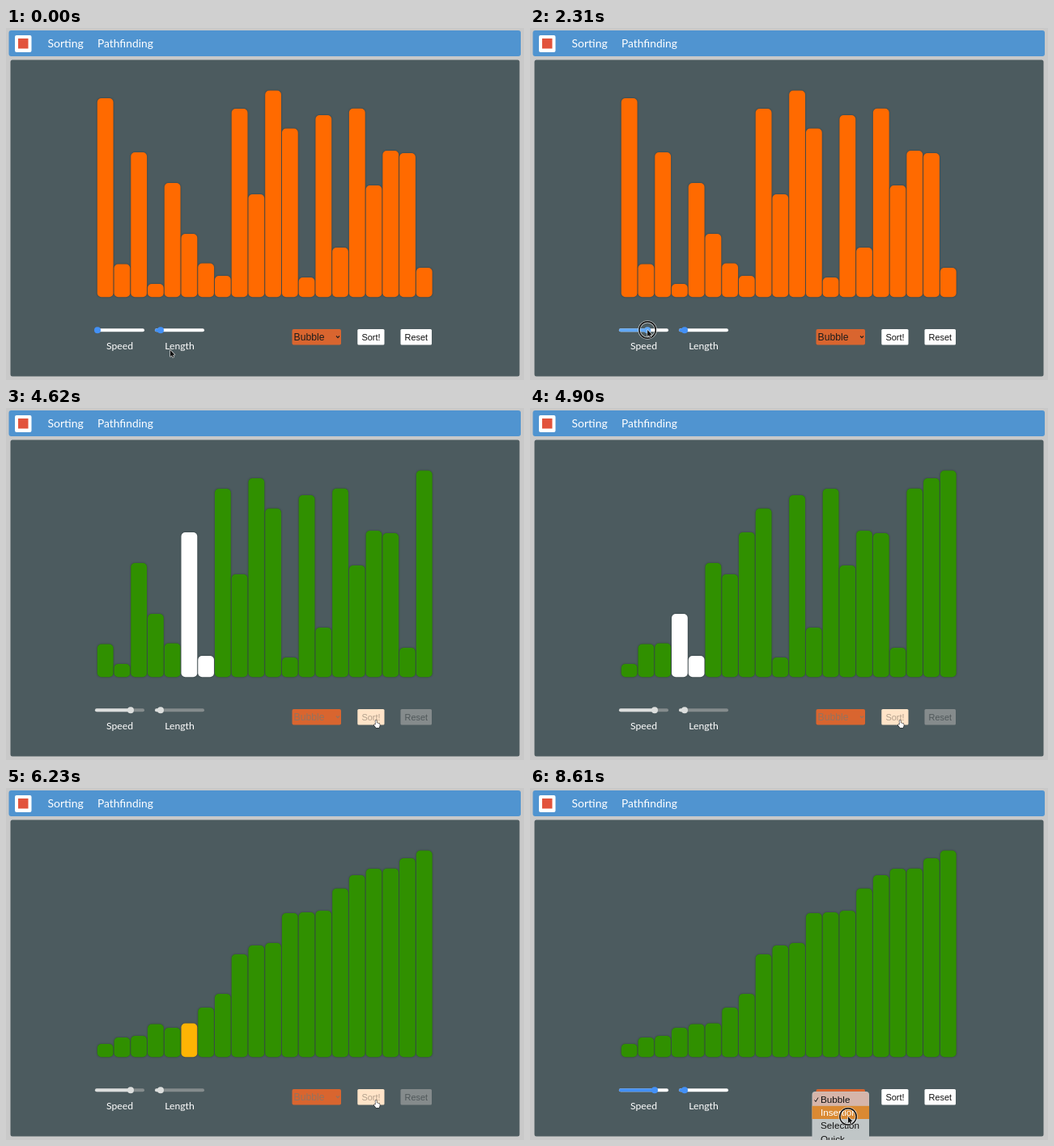
Write an HTML page with a canvas that moves like this. It is 640 px wide and 436 px high and loops after 8680 ms.

```html
<!DOCTYPE html>
<html lang="en">
<head>
<meta charset="utf-8">
<title>Sorting visualizer</title>
<style>
  html, body { margin: 0; width: 640px; height: 436px; overflow: hidden; background: #c9c9c9; }
  canvas { display: block; }
</style>
</head>
<body>
<canvas id="stage" width="640" height="436"></canvas>
<script>
const ctx = document.getElementById('stage').getContext('2d');
const LOOP = 8680, TICK = 70;
const BASE = 333, BAR_X = 112.8, PITCH = 20.74, BAR_W = 19.8;
const HEIGHTS = [246, 40.5, 179, 16, 141, 78, 41.5, 26, 233, 127,
  255.5, 208.5, 24, 225, 61, 233.2, 138, 181, 178, 36];

// Bubble sort timing in ms
const SORT_START = 4418, COMPARE = 5.727, SWAP = 2.913, FLASH = 3;
const POPUP_AT = 7490;

const ORANGE = '#ff6a00', GREEN = '#309000', YELLOW = '#ffb404', WHITE = '#ffffff';
const PANEL = '#4c5b5f', BLUE = '#4390f5';
const SANS = '"Liberation Sans", Arial, sans-serif';
const LABEL = 'Lato, "Open Sans", sans-serif';

// Cursor moves: start, end, x, y
const MOVES = [
  [350, 1200, 113, 374],
  [1750, 2550, 154, 374],
  [3000, 3920, 457, 388],
  [6930, 7400, 389, 384],
  [7840, 8400, 393, 407]
];
// Intervals with the mouse button held
const PRESSES = [[1540, 2730], [4270, 4420], [7420, 7560], [8470, LOOP]];

const clamp = v => Math.max(0, Math.min(1, v));
const ease = p => p * p * (3 - 2 * p);

function cursorAt(t) {
  let x = 203, y = 399;
  for (const [from, to, nx, ny] of MOVES) {
    const p = ease(clamp((t - from) / (to - from)));
    x += (nx - x) * p;
    y += (ny - y) * p;
  }
  return { x, y };
}

function sortAt(t) {
  const bars = HEIGHTS.slice(), n = bars.length;
  const colors = bars.map(() => ORANGE);
  let clock = SORT_START;
  if (t < clock) return { bars, colors, busy: false };
  for (let pass = 0; pass < n; pass++) {
    for (let j = 0; j < n - 1; j++) {
      const swaps = bars[j] > bars[j + 1];
      const end = clock + COMPARE + (swaps ? SWAP : 0);
      if (t < clock + FLASH) {
        colors[j] = colors[j + 1] = WHITE;
        return { bars, colors, busy: true };
      }
      if (swaps) [bars[j], bars[j + 1]] = [bars[j + 1], bars[j]];
      colors[j] = colors[j + 1] = GREEN;
      if (t < end) {
        if (swaps) colors[j + 1] = YELLOW;
        return { bars, colors, busy: true };
      }
      clock = end;
    }
  }
  return { bars, colors, busy: false };
}

function box(x, y, w, h, r, fill) {
  ctx.fillStyle = fill;
  ctx.beginPath();
  ctx.roundRect(x, y, w, h, r);
  ctx.fill();
}

function text(str, x, y, size, family, color, align = 'left') {
  ctx.font = `${size}px ${family}`;
  ctx.textAlign = align;
  ctx.fillStyle = color;
  ctx.fillText(str, x, y);
}

function disc(x, y, r, fill) {
  ctx.fillStyle = fill;
  ctx.beginPath();
  ctx.arc(x, y, r, 0, Math.PI * 2);
  ctx.fill();
}

function drawPage() {
  ctx.fillStyle = '#c9c9c9';
  ctx.fillRect(0, 0, 640, 436);
  box(3.5, 3, 632.5, 32, 3, '#5094d0');
  box(5.5, 39.5, 629, 392, 2.5, PANEL);
  box(11, 9, 20.5, 21, 2, WHITE);
  box(15, 13, 12.5, 12.5, 0, '#e2533c');
  text('Sorting', 51.5, 24, 14, LABEL, WHITE);
  text('Pathfinding', 113, 24, 13.8, LABEL, WHITE);
  text('Speed', 140.5, 398, 12.2, LABEL, WHITE, 'center');
  text('Length', 214.5, 398, 12.2, LABEL, WHITE, 'center');
}

function drawBars({ bars, colors }) {
  ctx.save();
  ctx.shadowColor = 'rgba(20, 30, 30, 0.55)';
  ctx.shadowBlur = 2;
  bars.forEach((h, i) => box(BAR_X + i * PITCH, BASE - h, BAR_W, h + 0.3, 5, colors[i]));
  ctx.restore();
}

function drawSlider(x, knob, busy, held) {
  const fill = busy ? '#dcdedd' : held ? '#62a9f6' : BLUE;
  box(x, 372.2, 61, 4, 2, busy ? '#858c8d' : WHITE);
  box(x, 372.2, knob - x, 4, 2, fill);
  disc(knob, 374.2, 4, fill);
}

function drawControls(busy, hover) {
  const ink = busy ? '#94735f' : '#1d1d1d';
  box(353.5, 373, 60.5, 19.5, 2, '#d9652f');
  text('Bubble', 355.5, 387, 12.2, SANS, ink);
  ctx.strokeStyle = ink;
  ctx.lineWidth = 1.1;
  ctx.beginPath();
  ctx.moveTo(408, 381.5);
  ctx.lineTo(410, 383.6);
  ctx.lineTo(412, 381.5);
  ctx.stroke();

  box(434.3, 373, 33.2, 19.5, 1.5, hover ? '#ffe4c8' : WHITE);
  text('Sort!', 451, 386.5, 11, SANS, busy ? '#b3a08c' : '#111', 'center');
  box(487.5, 373, 38.5, 19.5, 1.5, busy ? '#858b8c' : WHITE);
  text('Reset', 506.8, 386.5, 10.9, SANS, busy ? '#50585a' : '#111', 'center');
}

function drawPopup(cursorY) {
  box(348.5, 376, 70.5, 70, 4, '#c0c6c7');
  box(349, 376.5, 69.5, 17, [4, 4, 0, 0], '#d6b5aa');
  const active = Math.floor((cursorY - 377.5) / 16.3);
  ['Bubble', 'Insertion', 'Selection', 'Quick'].forEach((name, i) => {
    const y = 377.5 + i * 16.3;
    if (i === active) box(348.5, y, 70.5, 16.3, 0, '#da8932');
    text(name, 359, y + 12.1, 11.7, SANS, i === active ? WHITE : '#111');
  });
  ctx.strokeStyle = active === 0 ? WHITE : '#111';
  ctx.lineWidth = 1;
  ctx.beginPath();
  ctx.moveTo(351.5, 386.5);
  ctx.lineTo(353, 388.5);
  ctx.lineTo(356, 383.5);
  ctx.stroke();
}

function shape(x, y, points, fill, line) {
  ctx.beginPath();
  points.forEach(([dx, dy]) => ctx.lineTo(x + dx, y + dy));
  ctx.closePath();
  ctx.lineJoin = 'round';
  ctx.strokeStyle = line;
  ctx.lineWidth = 1.2;
  ctx.stroke();
  ctx.fillStyle = fill;
  ctx.fill();
}

function drawCursor({ x, y }, hand, pressed) {
  if (pressed) {
    for (const [color, width] of [['rgba(255,255,255,0.6)', 3.2], ['#111', 1.5]]) {
      ctx.strokeStyle = color;
      ctx.lineWidth = width;
      ctx.beginPath();
      ctx.arc(x, y, 10.2, 0, Math.PI * 2);
      ctx.stroke();
    }
  }
  if (hand) {
    shape(x, y, [[-0.6, -1], [0.8, -1], [1, 2], [4.5, 3], [4.8, 5.5], [3.8, 8],
      [0.2, 8], [-2.4, 4.6], [-1.6, 3.8], [-0.4, 4.6]], WHITE, '#222');
  } else {
    shape(x, y, [[0, 0], [0, 8], [1.8, 6.4], [3, 9], [4.3, 8.4], [3.1, 5.9], [5.5, 5.7]],
      '#111', '#e8e8e8');
  }
}

function draw(t) {
  const sort = sortAt(t), cur = cursorAt(t);
  const pressed = PRESSES.some(([from, to]) => t >= from && t < to);
  const dragging = pressed && t < 3000;
  const speed = 113 + 41 * ease(clamp((t - MOVES[1][0]) / (MOVES[1][1] - MOVES[1][0])));
  const hover = cur.x > 434 && cur.x < 468 && cur.y > 373 && cur.y < 393;

  drawPage();
  drawBars(sort);
  drawSlider(110, speed, sort.busy, dragging);
  drawSlider(184, 191, sort.busy, false);
  drawControls(sort.busy, hover);
  if (t >= POPUP_AT) drawPopup(cur.y);
  drawCursor(cur, hover, pressed);
}

const began = performance.now();
function frame() {
  const t = (performance.now() - began) % LOOP;
  draw(Math.floor(t / TICK) * TICK);
  requestAnimationFrame(frame);
}
frame();
</script>
</body>
</html>
```
